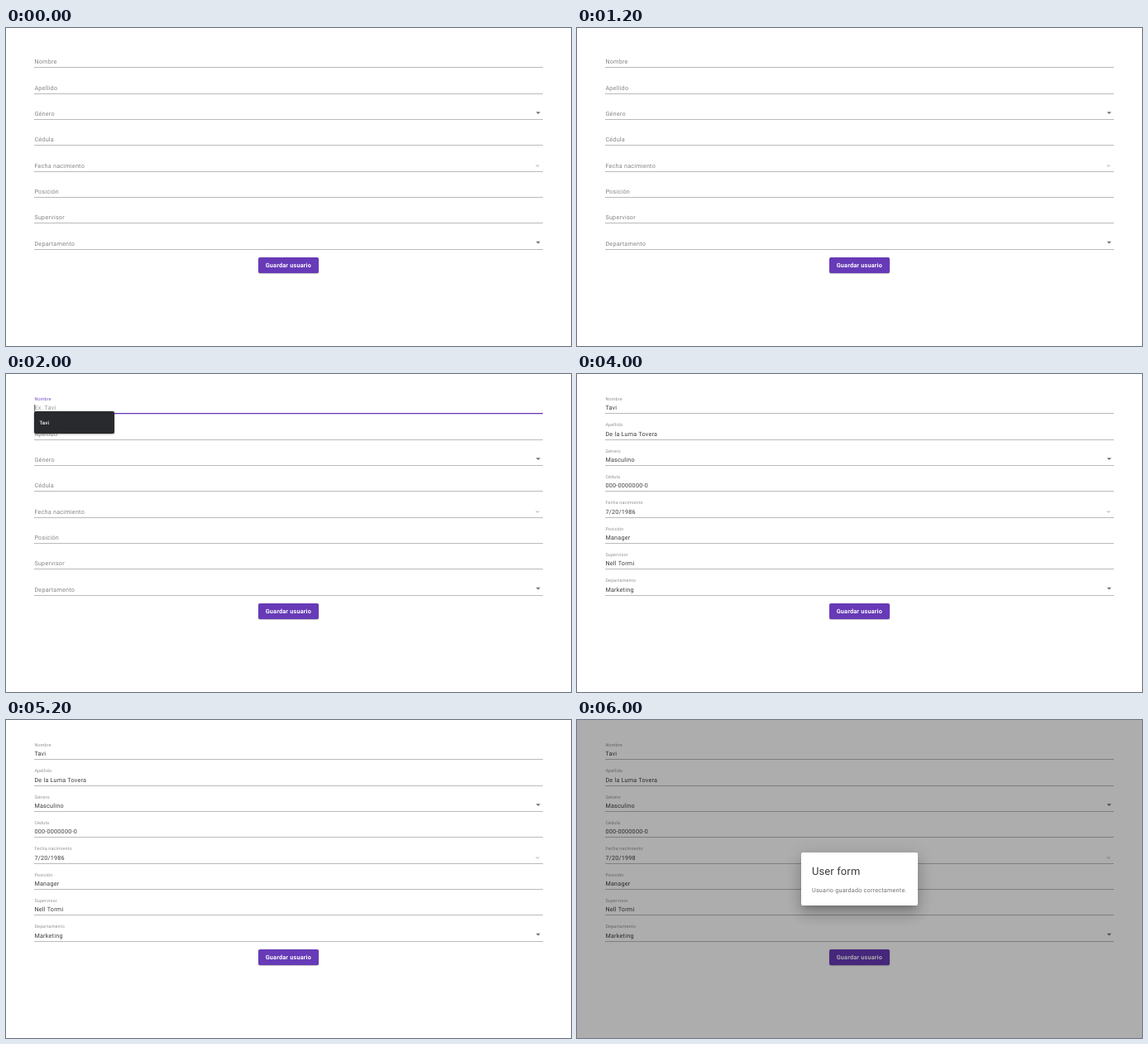
These frames come from a looping animation (683 px wide and 384 px high, 8 s). An HTML page:

```html
<!DOCTYPE html>
<html lang="es">
<head>
<meta charset="utf-8">
<title>User form</title>
<style>
  html, body { margin: 0; width: 100%; height: 100%; overflow: hidden; background: #fff; }
  .stage { position: absolute; left: 0; top: 0; width: 683px; height: 384px; overflow: hidden; }
  .stage > *, .modal > * { position: absolute; box-sizing: border-box; }
  svg { left: 0; top: 0; width: 683px; height: 384px; }
  text {
    font: 7.23px Roboto, Arial, sans-serif;
    letter-spacing: .03125em;
    text-rendering: geometricPrecision;
    fill: #3c3c3c;
  }
  .label { fill: #868686; }
  .small { font-size: 5.42px; fill: #919191; }
  .focus { fill: #7a52c4; }
  .hint { fill: #999; }
  .line { fill: #bababa; }
  .arrow { fill: #707070; }
  .chevron { fill: none; stroke: #888; stroke-width: .8; }
  .bold { font-weight: 700; fill: #fff; letter-spacing: .03em; }

  .button {
    left: 305px; top: 277px; width: 73px; height: 19px;
    border-radius: 2px; background: #673ab7;
    box-shadow: 0 .6px .8px rgba(0,0,0,.3), 0 .5px 2px rgba(0,0,0,.12);
  }
  .menu {
    left: 34px; top: 45px; width: 96.5px; height: 26.5px;
    border-radius: 2px; background: #292a2d;
    box-shadow: 0 .5px 2px rgba(0,0,0,.45);
  }
  .menu-text { font-size: 6.1px; font-weight: 500; fill: #fff; }
  .modal { inset: 0; background: rgba(0,0,0,.32); }
  .dialog {
    left: 271px; top: 160px; width: 141px; height: 64px;
    border-radius: 2px; background: #fff;
    box-shadow: 0 5px 7px -3px rgba(0,0,0,.2), 0 11px 17px 1.4px rgba(0,0,0,.14), 0 4px 21px 3.6px rgba(0,0,0,.12);
  }
  .title { font-size: 12.9px; letter-spacing: .0125em; }
  .body { fill: #707070; }

  .q1, .q2, .q3, .q4 { animation: quarter 8s step-end infinite; }
  .q2 { animation-delay: -6s; }
  .q3 { animation-delay: -4s; }
  .q4 { animation-delay: -2s; }
  .early, .late { animation: half 8s step-end infinite; }
  .late { animation-delay: -4s; }
  @keyframes quarter { 0% { opacity: 1; } 25%, 100% { opacity: 0; } }
  @keyframes half { 0% { opacity: 1; } 50%, 100% { opacity: 0; } }
</style>
</head>
<body>
<div class="stage">
  <svg id="form" viewBox="0 0 683 384"></svg>
  <div class="button"></div>
  <svg viewBox="0 0 683 384">
    <text class="bold" x="341.4" y="289.4" text-anchor="middle">Guardar usuario</text>
    <g class="q2">
      <text class="small focus" x="34.4" y="32">Nombre</text>
      <text class="hint" x="34.4" y="43.4">Ex. Tavi</text>
      <rect x="34.3" y="37" width=".8" height="8" fill="#444"/>
      <rect x="34" y="47" width="615" height="1.3" fill="#673ab7"/>
    </g>
  </svg>
  <div class="menu q2"></div>
  <svg class="q2" viewBox="0 0 683 384">
    <text class="menu-text" x="40.4" y="60.8">Tavi</text>
  </svg>
  <div class="modal q4">
    <div class="dialog"></div>
    <svg viewBox="0 0 683 384">
      <text class="title" x="284" y="186.6">User form</text>
      <text class="body" x="284" y="207.6">Usuario guardado correctamente.</text>
    </svg>
  </div>
</div>
<script>
  const fields = [
    ['Nombre', 'Tavi'],
    ['Apellido', 'De la Luma Tovera'],
    ['Género', 'Masculino', 'select'],
    ['Cédula', '000-0000000-0'],
    ['Fecha nacimiento', '7/20/1986', 'date'],
    ['Posición', 'Manager'],
    ['Supervisor', 'Nell Tormi'],
    ['Departamento', 'Marketing', 'select']
  ];
  const pitch = 31.3;
  const text = (cls, y, str) => `<text class="${cls}" x="34.4" y="${y}">${str}</text>`;
  const icons = {
    select: y => `<path class="arrow" d="M640.6 ${y}h5.4l-2.7 2.8z"/>`,
    date: y => `<path class="chevron" d="M640.7 ${y + 1.6}l1.8 1.5 1.8-1.5"/>`
  };

  document.getElementById('form').innerHTML = fields.map(([name, value, kind], i) => {
    const top = i * pitch;
    const base = 43.4 + top;
    const values = kind === 'date'
      ? text('q3', base, value) + text('q4', base, '7/20/1998')
      : text('late', base, value);
    return `<rect class="line" x="34" y="${Math.floor(47.95 + top)}" width="615" height="1"/>`
      + text(i ? 'label early' : 'label q1', base, name)
      + `<g class="late">${text('small', 32 + top, name)}</g>`
      + values
      + (kind ? icons[kind](38.7 + top) : '');
  }).join('');
</script>
</body>
</html>
```
